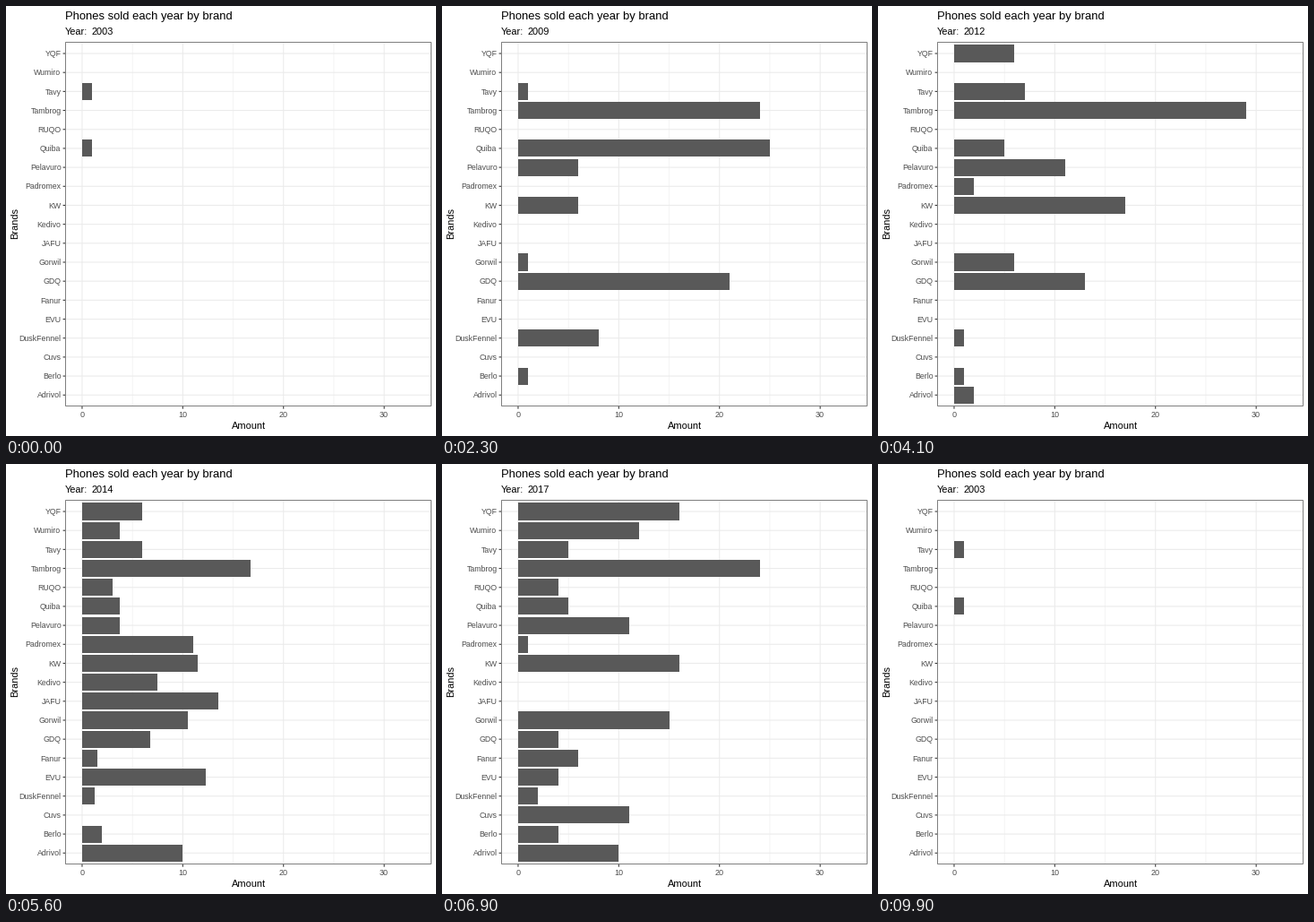
These frames come from a looping animation (480x480 px, 10000 ms). A matplotlib script:

```python
import matplotlib.pyplot as plt
import numpy as np
from matplotlib.animation import FuncAnimation
from matplotlib.patches import Rectangle

SIZE, DPI = 480, 96
PX = 72 / DPI                       # one pixel in points
LEFT, TOP, RIGHT, BOTTOM = 66.5, 40.5, 474.5, 446.5
X0, UNIT = 84.95, 11.24             # x of zero, pixels per phone
Y0, ROW = 53.02, 21.18              # first row centre, row pitch
HALF = 0.45 * ROW

# Turning points (year, count) of each brand; it is absent outside them.
TRENDS = {
    "YQF": [(2011, 6), (2014, 5), (2017, 16), (2020, 1)],
    "Wumiro": [(2014, 3), (2020, 20)],
    "Tavy": [(2003, 1), (2009, 1), (2012, 7), (2020, 4)],
    "Tambrog": [(2009, 24), (2012, 29), (2014, 16), (2020, 33)],
    "RUQO": [(2014, 3), (2017, 4), (2020, 12)],
    "Quiba": [(2003, 1), (2007, 3), (2009, 25), (2012, 5), (2016, 2), (2020, 13)],
    "Pelavuro": [(2006, 1), (2012, 11), (2014, 3), (2020, 19)],
    "Padromex": [(2012, 2), (2014, 12), (2017, 1)],
    "KW": [(2008, 2), (2012, 17), (2014, 11), (2020, 21)],
    "Kedivo": [(2014, 7), (2016, 11)],
    "JAFU": [(2014, 14), (2016, 10)],
    "Gorwil": [(2009, 1), (2017, 15), (2020, 12)],
    "GDQ": [(2008, 12), (2009, 21), (2014, 7), (2020, 1)],
    "Fanur": [(2014, 1), (2017, 6), (2020, 3)],
    "EVU": [(2014, 9), (2015, 22), (2017, 4), (2020, 4)],
    "DuskFennel": [(2009, 8), (2012, 1), (2018, 2)],
    "Cuvs": [(2015, 4), (2017, 11), (2020, 2)],
    "Berlo": [(2007, 1), (2012, 1), (2020, 5)],
    "Adrivol": [(2012, 2), (2015, 13), (2020, 6)],
}
LAST_TREND, DECLINE = 2020, 0.7     # afterwards all shrink by this factor
YEARS = [2003, 2006, *range(2007, 2023)]


def count(points, year):
    years, values = zip(*points)
    value = np.interp(min(year, LAST_TREND), years, values, left=0, right=0)
    return np.round(value * DECLINE ** max(0, year - LAST_TREND))


COUNTS = [np.array([count(p, y) for p in TRENDS.values()]) for y in YEARS]


def year_end(i):
    """Frame on which year i has fully given way to the next."""
    return 5 + 6 * i - (i > 7) - max(0, i - 10)


def state(frame):
    """Year and bar lengths; bars enter on the last step, leave on the first."""
    i = sum(year_end(j) <= frame for j in range(len(YEARS))) % len(YEARS)
    a, b = COUNTS[i], COUNTS[(i + 1) % len(YEARS)]
    steps = 3 if i <= 10 else 2
    k = frame % 99 - (year_end(i) - steps)
    if k <= 0:
        return YEARS[i], a
    p = 0.5 - 0.5 * np.cos(np.pi * k / steps)
    return YEARS[i], np.where((a > 0) & (b > 0), a + (b - a) * p, 0)


plt.rcParams["font.family"] = "Liberation Sans"
fig = plt.figure(figsize=(SIZE / DPI, SIZE / DPI), dpi=DPI, facecolor="white")
ax = fig.add_axes([0, 0, 1, 1])
ax.set_xlim(0, SIZE)
ax.set_ylim(SIZE, 0)
ax.axis("off")


def line(xs, ys, color, width, z):
    ax.plot(xs, ys, color=color, lw=width * PX, zorder=z, snap=False,
            solid_capstyle="butt")


def label(x, y, text, size, color="black", **kw):
    return ax.text(x, y, text, fontsize=size * PX, color=color,
                   va="baseline", **kw)


GRID, TICK, MUTED = "#ebebeb", "#333333", "#4d4d4d"

for v in range(0, 31, 5):
    x = X0 + v * UNIT
    major = v % 10 == 0
    line([x, x], [TOP, BOTTOM], GRID, 1.07 if major else 0.53, 1 + major)
    if major:
        line([x, x], [447, 449.7], TICK, 1.07, 2)
        label(x - 0.3, 459, str(v), 9, MUTED, ha="center")

bars = []
for i, brand in enumerate(TRENDS):
    y = Y0 + i * ROW
    line([LEFT, RIGHT], [y, y], GRID, 1.07, 2)
    line([63.6, 66.4], [y, y], TICK, 1.07, 2)
    label(61.5, y + 3.2, brand, 8.8, MUTED, ha="right")
    top, bottom = round(y - HALF), round(y + HALF)
    bar = Rectangle((round(X0), top), 0, bottom - top, facecolor="#595959",
                    linewidth=0, antialiased=False, zorder=3)
    bars.append(ax.add_patch(bar))

ax.add_patch(Rectangle((LEFT, TOP), RIGHT - LEFT, BOTTOM - TOP, fill=False,
                       edgecolor="#7f7f7f", linewidth=PX, snap=False,
                       zorder=4))

label(66, 15, "Phones sold each year by brand", 13)
label(66, 32, "Year:", 11)
year_text = label(96, 32, "", 11)
label(271, 472, "Amount", 11, ha="center")
label(13, 243, "Brands", 11, ha="center", rotation=90,
      rotation_mode="anchor")


def draw(frame):
    year, values = state(frame)
    year_text.set_text(str(year))
    for bar, v in zip(bars, values):
        bar.set_width(round(X0 + v * UNIT) - round(X0))
        bar.set_visible(bool(v > 0))
    return bars + [year_text]


anim = FuncAnimation(fig, draw, frames=100, interval=100, repeat=True,
                     repeat_delay=0)
plt.show()
```
